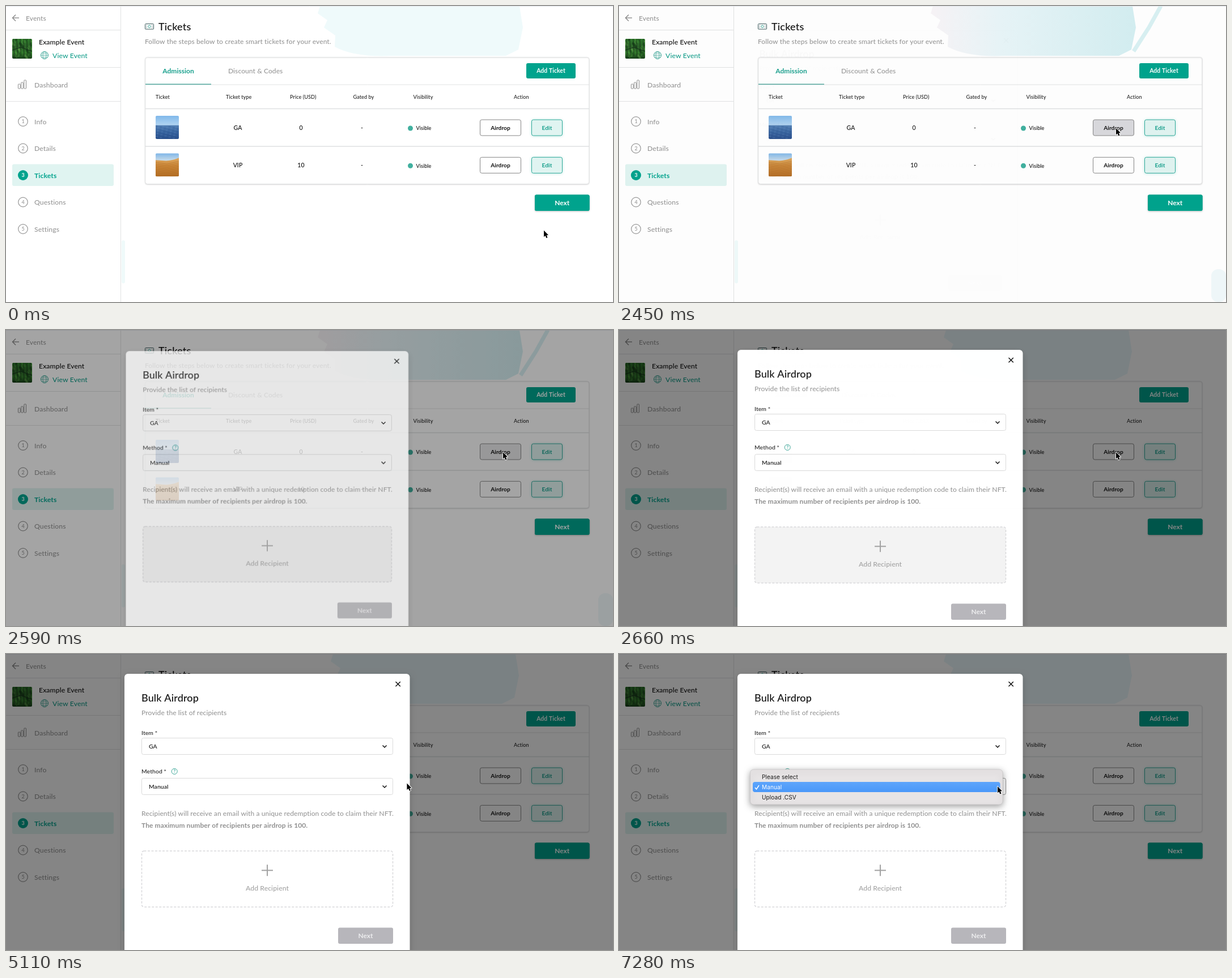
These frames come from a looping animation (1071 px wide and 523 px high, 8 s). An HTML page with a canvas:

```html
<!DOCTYPE html>
<html lang="en">
<head>
<meta charset="utf-8">
<title>Bulk airdrop</title>
<style>
  html, body { margin: 0; width: 100%; height: 100%; overflow: hidden; background: #fff; }
  canvas { display: block; }
</style>
</head>
<body>
<canvas id="stage" width="1071" height="523"></canvas>
<script>
const stageCtx = document.getElementById('stage').getContext('2d');
const layer = document.createElement('canvas');
layer.width = 1071;
layer.height = 600;
const layerCtx = layer.getContext('2d');
let ctx = stageCtx;

const LOOP = 8000, STEP = 70;
const TEAL = '#00a38d', GRAY = '#979797', INK = '#111', LINE = '#e1e2e3';

const clamp = v => Math.min(1, Math.max(0, v));
const lerp = (a, b, p) => a + (b - a) * p;
const smooth = v => { v = clamp(v); return v * v * (3 - 2 * v); };
const easeOut = v => 1 - (1 - clamp(v)) ** 2;

// Draws text whose capitals are centred vertically on y.
function text(s, x, y, size = 12, color = GRAY, { weight = 500, align = 'left', family = 'Lato', gap = size / 130 } = {}) {
  ctx.font = `${weight} ${size}px ${family}, sans-serif`;
  ctx.letterSpacing = gap + 'px';
  ctx.textAlign = align;
  ctx.fillStyle = color;
  ctx.fillText(s, x, y + size * 0.36);
}

function box(x, y, w, h, r, fill, stroke, width = 1) {
  ctx.beginPath();
  ctx.roundRect(x, y, w, h, r);
  if (fill) { ctx.fillStyle = fill; ctx.fill(); }
  if (stroke) { ctx.strokeStyle = stroke; ctx.lineWidth = width; ctx.stroke(); }
}

function path(points, color, width = 1) {
  ctx.beginPath();
  for (const [x, y] of points) ctx.lineTo(x, y);
  ctx.strokeStyle = color;
  ctx.lineWidth = width;
  ctx.stroke();
}

function ring(x, y, rx, ry, color, width = 1) {
  ctx.beginPath();
  ctx.ellipse(x, y, rx, ry, 0, 0, Math.PI * 2);
  ctx.strokeStyle = color;
  ctx.lineWidth = width;
  ctx.stroke();
}

function disc(x, y, r, color) {
  ctx.beginPath();
  ctx.arc(x, y, r, 0, Math.PI * 2);
  ctx.fillStyle = color;
  ctx.fill();
}

const hLine = (x1, x2, y, color = LINE, width = 1) => path([[x1, y], [x2, y]], color, width);

function shadow(color, blur, dy, draw) {
  ctx.save();
  ctx.shadowColor = color;
  ctx.shadowBlur = blur;
  ctx.shadowOffsetY = dy;
  draw();
  ctx.restore();
}

function vertical(y1, y2, ...stops) {
  const g = ctx.createLinearGradient(0, y1, 0, y2);
  for (const [at, color] of stops) g.addColorStop(at, color);
  return g;
}

function clipped(x, y, w, h, r, draw) {
  ctx.save();
  ctx.beginPath();
  ctx.roundRect(x, y, w, h, r);
  ctx.clip();
  draw();
  ctx.restore();
}

function forest(x, y) {
  clipped(x, y, 35, 35, 2, () => {
    box(x, y, 35, 35, 0, vertical(y, y + 35, [0, '#2f7a2c'], [0.4, '#2b6128'], [0.7, '#337a2c'], [1, '#173d18']));
    for (let i = 0; i < 60; i++) {
      const px = x + (i * 13.7) % 35, py = y + (i * 7.9) % 35;
      disc(px, py, 1 + i % 2, ['#4f9c3d66', '#12351588', '#79b95a55'][i % 3]);
    }
    for (let i = 0; i < 6; i++) path([[x + 2 + i * 6, y], [x + 4 + i * 5.6, y + 30]], '#10291399', 1.3);
    path([[x, y + 20], [x + 15, y + 15], [x + 35, y + 22]], '#15301acc', 1.5);
  });
}

function sea(x, y) {
  clipped(x, y, 41, 41, 2, () => {
    box(x, y, 41, 41, 0, vertical(y, y + 41,
      [0, '#80b8ea'], [0.4, '#b1d4f1'], [0.41, '#5380b4'], [0.7, '#37639f'], [1, '#294f8c']));
    for (let i = 0; i < 45; i++) {
      const px = x + (i * 11.3) % 38;
      hLine(px, px + 4, y + 18 + i / 2, i % 2 ? '#6d95c455' : '#1d427855');
    }
  });
}

function dunes(x, y) {
  clipped(x, y, 41, 41, 2, () => {
    box(x, y, 41, 41, 0, vertical(y, y + 14, [0, '#7fb6e8'], [1, '#cfdfe9']));
    ctx.beginPath();
    ctx.moveTo(x, y + 12);
    ctx.lineTo(x + 15, y + 13);
    ctx.quadraticCurveTo(x + 27, y + 14, x + 41, y + 8);
    ctx.lineTo(x + 41, y + 41);
    ctx.lineTo(x, y + 41);
    ctx.fillStyle = vertical(y + 9, y + 41, [0, '#dda65d'], [0.4, '#cc8838'], [1, '#b56f24']);
    ctx.fill();
    for (let i = 0; i < 9; i++) path([[x, y + 16 + i * 3], [x + 20, y + 19 + i * 3], [x + 41, y + 14 + i * 3]], '#99591d55', 1);
  });
}

// Pale paint wash behind the page header.
function wash(fading, dimmed) {
  const left = dimmed ? 573 : 550, right = dimmed ? 905 : 912;
  ctx.beginPath();
  ctx.moveTo(left + 4, 0);
  ctx.lineTo(left, 13);
  ctx.lineTo(left + 17, 25);
  ctx.lineTo(left + 11, 38);
  ctx.lineTo(left + 31, 52);
  ctx.lineTo(left + 30, 72);
  ctx.quadraticCurveTo(left + 65, 91, left + 130, 88);
  ctx.lineTo(right - 30, 88);
  ctx.lineTo(right - 8, 77);
  ctx.lineTo(right, 38);
  ctx.lineTo(right - 6, 0);
  if (fading) {
    const g = ctx.createLinearGradient(left, 0, 960, 0);
    g.addColorStop(0, '#f8f4f7');
    g.addColorStop(0.3, '#e8f5f8');
    g.addColorStop(1, '#d0edf0');
    ctx.fillStyle = g;
  } else ctx.fillStyle = dimmed ? '#e9f6fb' : '#effafb';
  ctx.fill();
  if (fading) {
    path([[908, 80], [935, 38], [956, 0]], '#d9f1f3', 7);
    box(1045, 465, 26, 58, 12, '#f0f8fa');
  }
  box(204, 414, 6, 76, 3, '#effafa');
}

function sidebar() {
  path([[202.5, 0], [202.5, 523]], LINE);
  for (const y of [42.5, 108.5, 168.5]) hLine(0, 202, y);

  hLine(11.5, 23, 21, '#858585', 1.3);
  path([[17, 15.5], [11.5, 21], [17, 26.5]], '#858585', 1.3);
  text('Events', 35, 21.5);

  forest(11, 58);
  text('Example Event', 58, 64, 12.2, INK);
  const globe = '#3aa596';
  ring(68, 87, 6.5, 6.5, globe);
  ring(68, 87, 3, 6.5, globe, 0.8);
  hLine(61.5, 74.5, 87, globe, 0.8);
  hLine(62.5, 73.5, 83.5, globe, 0.6);
  hLine(62.5, 73.5, 90.5, globe, 0.6);
  text('View Event', 82, 88, 12.2, '#169f8c');

  [8, 11, 15].forEach((h, i) => box(21.5 + i * 5.2, 146 - h, 3.6, h, 1, null, '#8d8d8d'));
  text('Dashboard', 50, 139.5, 12.2);

  box(11, 279.5, 179, 38.5, 3, '#e0f4f1');
  ['Info', 'Details', 'Tickets', 'Questions', 'Settings'].forEach((label, i) => {
    const y = 204 + i * 47.5, active = i === 2;
    if (active) disc(30, y, 9, TEAL);
    else ring(30, y, 8.3, 8.3, GRAY, 1.2);
    text(String(i + 1), 30, y, 9, active ? '#fff' : GRAY, { align: 'center', weight: active ? 700 : 500, gap: 0 });
    text(label, 50, y + 0.3, 12.2, active ? TEAL : GRAY, { weight: active ? 700 : 500 });
  });
}

function button(label, x, y, w, h, size, fill, color, stroke) {
  box(x, y, w, h, 3, fill, stroke);
  text(label, x + w / 2, y + h / 2 + 0.2, size, color, { align: 'center', weight: 700 });
}

function row(y, kind, price, picture, press) {
  picture(264, y - 21);
  const cell = { align: 'center' };
  text(kind, 409, y, 10.5, INK, cell);
  text(price, 520.5, y, 10.5, INK, cell);
  text('-', 628, y, 10.5, INK, cell);
  disc(713.5, y + 1, 4.5, '#41b09f');
  text('Visible', 723.5, y + 1, 9, INK);
  const shade = Math.round(lerp(255, 217, press));
  button('Airdrop', 836.5, y - 14, 72, 28, 10.1, `rgb(${shade},${shade},${shade + Math.round(press * 4)})`, INK, '#858585');
  shadow('#00a38d55', 5, 0, () => box(927.5, y - 13.5, 54, 28, 3, '#e0f4f1'));
  button('Edit', 927.5, y - 14, 54, 28, 10.1, '#e0f4f1', '#169f8c', '#32ab9b');
}

function page(press) {
  const slate = '#3d5b5d';
  box(245.5, 31.5, 15, 9.5, 1, null, slate);
  ring(253, 36.2, 2.2, 2.2, '#3aa596');
  for (const x of [248, 258]) for (const y of [33.8, 36.2, 38.6]) disc(x, y, 0.6, slate);
  text('Tickets', 269, 36.5, 18.1, INK);
  text('Follow the steps below to create smart tickets for your event.', 245, 63);

  shadow('#0000001c', 2, 1, () => box(245.5, 90.5, 783.5, 224, 4, '#fff', LINE));
  text('Admission', 304, 114.5, 12, '#169f8c', { align: 'center', weight: 700, gap: 0 });
  text('Discount & Codes', 392, 114.5);
  button('Add Ticket', 918, 101, 87, 27, 10.4, TEAL, '#fff');
  hLine(246, 1029, 139);
  hLine(246, 362, 138.3, '#55aaa0', 1.5);

  const heads = [['Ticket', 264], ['Ticket type', 388], ['Price (USD)', 501], ['Gated by', 612.5], ['Visibility', 718.5], ['Action', 896]];
  for (const [label, x] of heads) text(label, x, 160.5, 9.1, '#222');
  for (const y of [181.5, 248]) hLine(246, 1029, y, '#dfe1e2', 1.6);
  row(215, 'GA', '0', sea, press);
  row(281.3, 'VIP', '10', dunes, 0);

  shadow('#00000040', 3, 1, () => box(933, 333.5, 96.5, 28.5, 3, TEAL));
  button('Next', 933, 333.5, 96.5, 28.5, 11.9, TEAL, '#fff');
}

function select(y, value, border) {
  box(239.5, y, 443, 29, 3, '#fff', border);
  text(value, 252, y + 14.6, 10.4, INK);
  path([[664.5, y + 13], [668, y + 16.5], [671.5, y + 13]], INK, 1.5);
}

function modal(settled, focused) {
  shadow('#00000030', 12, 4, () => box(209, 35, 503.5, 560, 6, '#fff'));
  path([[687.5, 49], [695.8, 57.3]], INK, 1.5);
  path([[695.8, 49], [687.5, 57.3]], INK, 1.5);
  text('Bulk Airdrop', 239, 77.3, 18, INK);
  text('Provide the list of recipients', 239, 103.7);
  text('Item *', 239, 139.5, 10.4, '#222');
  select(148.5, 'GA', '#dadada');
  text('Method *', 239, 207.7, 10.4, '#222');
  ring(297.2, 207.4, 5, 5, '#3aa596');
  text('?', 297.2, 207.5, 8, '#169f8c', { align: 'center', gap: 0 });
  select(219.5, 'Manual', focused ? '#8e8e8e' : '#dadada');
  text('Recipient(s) will receive an email with a unique redemption code to claim their NFT.', 239, 282);
  text('The maximum number of recipients per airdrop is 100.', 239, 302.7, 12, '#8f8f8f', { weight: 700 });

  ctx.save();
  ctx.setLineDash([4, 2.5]);
  box(239.5, 348, 443, 99, 4, settled ? '#fff' : '#f3f3f3', '#d9d9dc', 1.5);
  ctx.restore();
  hLine(451, 471, 382.3, '#a2a2a2', 2);
  path([[461, 372.3], [461, 392.3]], '#a2a2a2', 2);
  text('Add Recipient', 461, 414, 12.2, '#a2a2a2', { align: 'center' });
  button('Next', 586, 483.5, 97, 28.5, 11.9, '#b7b6bb', '#ededef');
}

// The dialog fades and grows as one layer, so it is composed off screen.
function modalEntering(shown) {
  ctx = layerCtx;
  ctx.clearRect(0, 0, layer.width, layer.height);
  modal(false, false);
  ctx = stageCtx;

  const scale = lerp(0.962, 1, shown);
  ctx.save();
  ctx.globalAlpha = shown;
  ctx.translate(461, 262);
  ctx.scale(scale, scale);
  ctx.drawImage(layer, -461, -262);
  ctx.restore();
}

function menu() {
  shadow('#00000060', 12, 3, () => box(231.5, 204, 445.5, 62, 6, '#e7e4e5', '#c4c2c3', 0.7));
  box(236, 226, 436.5, 18, 4, vertical(226, 244, [0, '#5ea5fb'], [1, '#4a98f9']));
  path([[240, 236], [242.5, 239], [247, 232]], '#fff', 1.5);
  ['Please select', 'Manual', 'Upload .CSV'].forEach((label, i) =>
    text(label, 252, 217.3 + i * 17.9, 10.2, i === 1 ? '#fff' : '#1c1c1c', { family: 'Inter', weight: 400, gap: 0 }));
}

function arrow(x, y) {
  ctx.save();
  ctx.translate(x, y);
  ctx.beginPath();
  for (const p of [[0, 0], [0, 11.5], [2.6, 9.2], [4.3, 13.4], [6.5, 12.5], [4.7, 8.5], [8, 8.3]]) ctx.lineTo(...p);
  ctx.closePath();
  ctx.lineJoin = 'round';
  ctx.strokeStyle = '#fff';
  ctx.lineWidth = 1.8;
  ctx.stroke();
  ctx.fillStyle = '#000';
  ctx.fill();
  ctx.restore();
}

function hand(x, y) {
  ctx.save();
  ctx.translate(x, y);
  ctx.beginPath();
  ctx.moveTo(-1.2, 8);
  ctx.lineTo(-1.4, 1);
  ctx.quadraticCurveTo(0, -0.8, 1.1, 1);
  ctx.lineTo(1.4, 5);
  ctx.quadraticCurveTo(3, 4, 3.9, 5.5);
  ctx.quadraticCurveTo(5.2, 4.7, 6, 6.2);
  ctx.quadraticCurveTo(7.6, 5.8, 7.7, 7.8);
  ctx.quadraticCurveTo(7.8, 11, 6, 14);
  ctx.lineTo(0, 14);
  ctx.quadraticCurveTo(-2, 11, -4.6, 8.4);
  ctx.quadraticCurveTo(-3.6, 6.4, -1.2, 8);
  ctx.fillStyle = '#fff';
  ctx.fill();
  ctx.strokeStyle = '#111';
  ctx.lineWidth = 1.1;
  ctx.stroke();
  for (const px of [1.2, 3.1, 5]) path([[px, 8.5], [px, 11.5]], '#111', 0.8);
  ctx.restore();
}

// Each leg: start, end, destination x, destination y, easing.
const legs = [
  [210, 1050, 884, 231, smooth],
  [1050, 1330, 877, 216, easeOut],
  [4160, 4970, 723, 226, smooth],
  [4970, 5810, 672, 234, easeOut],
  [5810, 6090, 668, 234, easeOut],
];

function pointer(t) {
  let x = 949, y = 396.5;
  for (const [start, end, toX, toY, ease] of legs) {
    const p = ease((t - start) / (end - start));
    x = lerp(x, toX, p);
    y = lerp(y, toY, p);
  }
  return [x, y];
}

function draw(t) {
  const shown = t < 2450 ? 0 : smooth((t - 2430) / 240);
  const press = smooth((t - 1890) / 350) * (1 - smooth((t - 2520) / 140));

  ctx.fillStyle = '#fff';
  ctx.fillRect(0, 0, 1071, 523);
  wash(shown > 0 && shown < 0.9, shown >= 0.9);
  sidebar();
  page(press);
  hLine(0, 1071, 0.5, '#e6e9ee');

  if (shown) {
    ctx.fillStyle = `rgba(0,0,0,${0.48 * shown})`;
    ctx.fillRect(0, 0, 1071, 523);
    if (shown < 1) modalEntering(shown);
    else modal(true, t >= 7000);
  }
  if (t >= 7070) menu();

  const [x, y] = pointer(t);
  (t < 2450 && y < 228 ? hand : arrow)(x, y);
}

const began = performance.now();
function tick() {
  const t = (performance.now() - began) % LOOP;
  draw(Math.floor(t / STEP) * STEP);
  requestAnimationFrame(tick);
}
tick();
</script>
</body>
</html>
```
